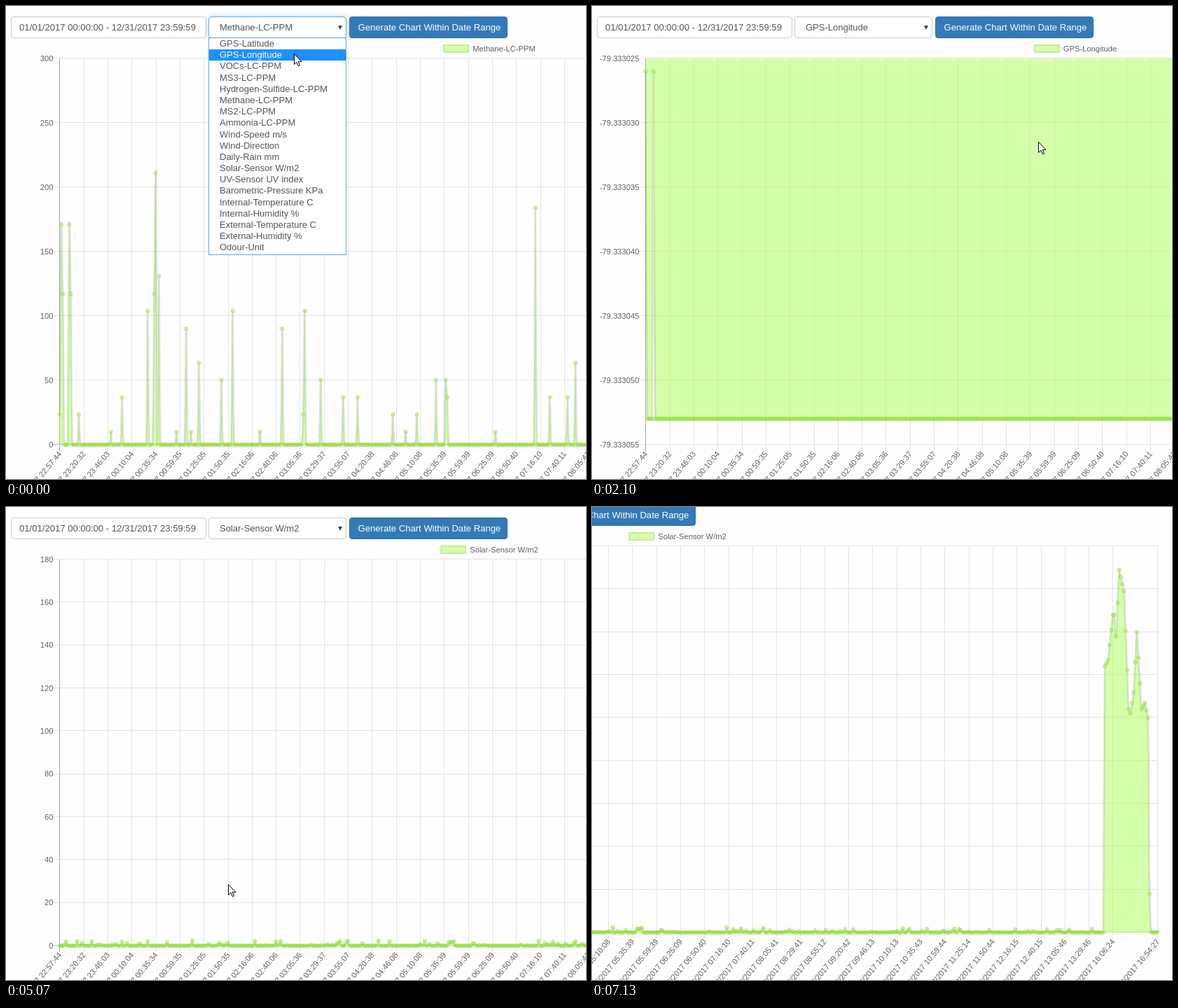
An HTML page with a canvas that plays this animation: 828x676 px, repeating every 8000 ms.

```html
<!DOCTYPE html>
<html lang="en">
<head>
<meta charset="utf-8">
<title>Sensor chart</title>
<style>
  html, body { margin: 0; width: 100%; height: 100%; overflow: hidden; background: #fefefe; }
  body { position: relative; font: 13px "Liberation Sans", Arial, sans-serif; color: #555; }
  #page { position: absolute; left: 0; top: 0; width: 1400px; height: 720px; }
  #page > * { position: absolute; box-sizing: border-box; white-space: nowrap; }
  svg, canvas { left: 0; top: 0; }
  .field { top: 14.5px; height: 31px; line-height: 29px; border: 1px solid #ccc; border-radius: 4px; background: #fff; }
  #range { left: 7px; width: 278.5px; padding-left: 11px; font-size: 13.1px; }
  #select { left: 289px; width: 197px; padding-left: 15px; }
  #select.focus { border-color: #66afe9; box-shadow: 0 0 7px rgba(102, 175, 233, .6); }
  #select::after { content: ""; position: absolute; right: 5px; top: 12px; border: 3px solid transparent; border-top: 6px solid #444; border-bottom: 0; }
  #button { left: 490px; width: 226px; padding-left: 11.5px; font-size: 13.1px; color: #fff; background: #337ab7; border-color: #2e6da4; }
  #button.hover { background: #286090; border-color: #204d74; }
  #list { left: 289px; top: 45px; width: 197px; height: 311px; background: #fff; border: 1px solid #66a3d8; }
  #list div { height: 16.2px; line-height: 16.2px; padding-left: 15px; }
  #list .on { background: #1e90ff; color: #fff; }
  #legend { left: 690px; top: 54px; height: 13px; display: flex; align-items: center; gap: 5px; transform: translateX(-50%); font-size: 11.2px; color: #606060; }
  #legend i { box-sizing: border-box; width: 37px; height: 12px; background: #d5fea9; border: 2px solid rgba(0, 0, 0, .07); }
  #grid text { font-size: 11.2px; fill: #606060; text-anchor: end; dominant-baseline: central; }
  #cursor { position: absolute; left: 0; top: 0; width: 14px; height: 21px; overflow: visible; }
</style>
</head>
<body>
<div id="page">
  <svg id="grid" width="1400" height="720"></svg>
  <canvas id="plot" width="1400" height="720"></canvas>
  <div id="legend"><i></i><span></span></div>
  <div id="range" class="field">01/01/2017 00:00:00 - 12/31/2017 23:59:59</div>
  <div id="select" class="field"></div>
  <div id="button" class="field">Generate Chart Within Date Range</div>
  <div id="list"></div>
</div>
<svg id="cursor"><path d="M.5 .5V15.5L4 12.3L6.4 17.8L8.6 16.8L6.2 11.4H11Z" fill="#fff" stroke="#000"/></svg>
<script>
const $ = id => document.getElementById(id);
const LOOP = 8000, TOP = 75, BOTTOM = 627, LEFT = 76.5, RIGHT = 1375.5, COUNT = 569;
const DX = (RIGHT - LEFT) / (COUNT - 1);

const options = ["GPS-Latitude", "GPS-Longitude", "VOCs-LC-PPM", "MS3-LC-PPM", "Hydrogen-Sulfide-LC-PPM",
  "Methane-LC-PPM", "MS2-LC-PPM", "Ammonia-LC-PPM", "Wind-Speed m/s", "Wind-Direction", "Daily-Rain mm",
  "Solar-Sensor W/m2", "UV-Sensor UV index", "Barometric-Pressure KPa", "Internal-Temperature C",
  "Internal-Humidity %", "External-Temperature C", "External-Humidity %", "Odour-Unit"];

const clamp = (v, a, b) => Math.max(a, Math.min(b, v));
const smooth = p => (p = clamp(p, 0, 1), p * p * (3 - 2 * p));

function random(seed) {
  return () => (seed = (seed * 16807) % 2147483647) / 2147483647;
}

// Linear value at x between [x, y] points
function between(points, x) {
  const i = points.findIndex(p => p[0] > x);
  if (i < 1) return 0;
  const [x0, y0] = points[i - 1], [x1, y1] = points[i];
  return y0 + (y1 - y0) * (x - x0) / (x1 - x0);
}

// Ticks come every 25.5 minutes, two in six after 24, with a slight clock drift
function tickTimes() {
  const out = ["22:57:44"];
  let s = (23 * 60 + 20) * 60 + 32;
  for (let i = 1; i < 36; i++) {
    const at = Math.round(s + (i > 1) + .38 * (i - 1));
    out.push([at / 3600 % 24, at / 60 % 60, at % 60].map(n => String(Math.floor(n)).padStart(2, "0")).join(":"));
    s += i % 6 === 2 || i % 6 === 4 ? 1440 : 1530;
  }
  return out.concat("16:06:24", "16:54:27");
}

const fill = rule => Array.from({ length: COUNT }, (_, i) => rule(i));

const rnd = random(71);
const peaks = new Map([[1, 171], [2, 117], [6, 171], [7, 117], [55, 104], [59, 117], [60, 211], [62, 131],
  [79, 90], [108, 104], [139, 90], [153, 104], [297, 184]]);
const methane = fill(i => {
  const hit = rnd() < .12, level = Math.floor(5 * rnd() ** 1.4);
  return peaks.get(i) || (hit ? 10 + 13.4 * level : 0);
});

const longitude = fill(i => i === 0 || i === 5 ? -79.333026 : -79.333053);

const daylight = [[534, 0], [535, 124], [537, 127], [540, 148], [541, 148], [542, 138], [544, 169], [547, 159],
  [550, 104], [551, 102], [553, 112], [555, 140], [558, 104], [560, 107], [562, 100], [563, 18], [564, 0], [570, 0]];
const solar = fill(i => {
  const hit = rnd() < .35, size = 2.5 * rnd() ** 3;
  return between(daylight, i) || (hit ? size : 0);
});

const charts = [
  { start: -2000, name: "Methane-LC-PPM", data: methane, min: 0, max: 300, step: 50, digits: 0 },
  { start: 1306, name: "GPS-Longitude", data: longitude, min: -79.333055, max: -79.333025, step: .000005, digits: 6 },
  { start: 4212, name: "Solar-Sensor W/m2", data: solar, min: 0, max: 180, step: 20, digits: 0 }
];

function drawGrid(c) {
  const line = (x1, y1, x2, y2, a) => `<path d="M${x1} ${y1}L${x2} ${y2}" stroke="rgba(0,0,0,${a})"/>`;
  let out = "";
  const rows = Math.round((c.max - c.min) / c.step);
  for (let i = 0; i <= rows; i++) {
    const y = TOP + (BOTTOM - TOP) * i / rows, ly = Math.round(y) - .5;
    out += line(LEFT - 9.5, ly, RIGHT, ly, c.min === 0 && i === rows ? .25 : .1);
    out += `<text x="67.5" y="${y - .5}">${(c.max - i * c.step).toFixed(c.digits)}</text>`;
  }
  tickTimes().forEach((time, i) => {
    const x = i < 37 ? LEFT + i * 15 * DX : RIGHT, lx = Math.round(x - .05) + .5;
    out += line(lx, TOP, lx, BOTTOM + 9.5, i ? .1 : .35);
    const day = i < 3 ? "11/02/2017" : "11/03/2017";
    out += `<text transform="translate(${x + .5} 638) rotate(-50)">${day} ${time}</text>`;
  });
  $("grid").innerHTML = out;
  $("legend").lastChild.textContent = c.name;
}

const ctx = $("plot").getContext("2d");

function drawPlot(c, t) {
  const left = 1 - Math.min(1, (t - c.start) / 800);
  const grown = 1 - left ** 4;
  const base = c.max < 0 ? TOP : BOTTOM;
  const pts = c.data.map((v, i) => {
    const y = BOTTOM - (v - c.min) / (c.max - c.min) * (BOTTOM - TOP);
    return { x: LEFT + i * DX, y: base + (y - base) * grown };
  });
  // Smoothed line: control points follow the neighbours, kept inside the chart
  pts.forEach((p, i) => {
    const a = pts[i - 1] || p, b = pts[i + 1] || p;
    const d1 = Math.hypot(p.x - a.x, p.y - a.y), d2 = Math.hypot(b.x - p.x, b.y - p.y);
    const f1 = .4 * d1 / (d1 + d2), f2 = .4 * d2 / (d1 + d2);
    p.inX = p.x - f1 * (b.x - a.x); p.inY = clamp(p.y - f1 * (b.y - a.y), TOP, BOTTOM);
    p.outX = p.x + f2 * (b.x - a.x); p.outY = clamp(p.y + f2 * (b.y - a.y), TOP, BOTTOM);
  });
  const curve = new Path2D();
  pts.forEach((p, i) => {
    const a = pts[i - 1];
    if (a) curve.bezierCurveTo(a.outX, a.outY, p.inX, p.inY, p.x, p.y);
    else curve.moveTo(p.x, p.y);
  });
  const area = new Path2D(curve);
  area.lineTo(RIGHT, base);
  area.lineTo(LEFT, base);

  ctx.clearRect(0, 0, 1400, 720);
  ctx.fillStyle = "rgba(172,255,86,.5)";
  ctx.fill(area);
  ctx.strokeStyle = "rgba(0,0,0,.1)";
  ctx.lineWidth = 2.75;
  ctx.lineJoin = "round";
  ctx.stroke(curve);
  ctx.fillStyle = "rgba(150,230,60,.35)";
  ctx.strokeStyle = "rgba(135,215,45,.5)";
  ctx.lineWidth = 1;
  for (const p of pts) {
    ctx.beginPath();
    ctx.arc(p.x, p.y, 2.6, 0, 7);
    ctx.fill();
    ctx.stroke();
  }
}

// Pointer rests: [arrive, leave, x, y]
const rests = [[0, 420, 411, 68], [990, 1135, 600, 28], [1359, 2100, 637, 194], [2722, 2860, 452, 32],
  [3268, 3410, 417, 236], [3814, 3960, 628, 34], [4224, 4500, 619, 148], [5330, LOOP, 200, 690]];

function pointer(t) {
  const i = rests.findIndex(r => r[1] >= t);
  const [arrive, , x, y] = rests[i];
  if (t >= arrive) return [x, y];
  const [, leave, x0, y0] = rests[i - 1];
  const f = smooth((t - leave) / (arrive - leave));
  return [x0 + (x - x0) * f, y0 + (y - y0) * f];
}

// The recording opens with two long holds, then advances in even steps
function snap(t) {
  if (t < 540) return t < 280 ? 0 : 280;
  return 540 + 136.4 * Math.min(48, Math.floor((t - 540) / 136.4));
}

$("list").innerHTML = options.map(o => `<div>${o}</div>`).join("");
let shown, lastTime;

function render(t) {
  const chart = charts.filter(c => c.start <= t).pop();
  if (chart !== shown) drawGrid(shown = chart);
  drawPlot(chart, t);

  const [x, y] = pointer(t);
  $("cursor").style.transform = `translate(${Math.round(x)}px,${Math.round(y)}px)`;
  const scrollX = Math.round(568 * smooth((t - 5802) / 1150)), scrollY = t > 7080 ? 19 : 0;
  $("page").style.transform = `translate(${-scrollX}px,${-scrollY}px)`;

  const picked = t < 280 ? 5 : t < 3380 ? 1 : 11;
  const open = t < 280 || (t > 2850 && t < 3380);
  $("select").textContent = options[picked];
  $("select").classList.toggle("focus", t < 1120 || (t > 2850 && t < 3940));
  $("button").classList.toggle("hover", x > 490 && x < 716 && y > 14 && y < 46);
  $("list").style.display = open ? "block" : "none";
  const row = y < 46 ? picked : Math.floor((y - 46) / 16.2);
  [...$("list").children].forEach((d, i) => d.classList.toggle("on", i === row));
}

function tick(now) {
  const t = snap(now % LOOP);
  if (t !== lastTime) render(lastTime = t);
  requestAnimationFrame(tick);
}
render(lastTime = 0);
requestAnimationFrame(tick);
</script>
</body>
</html>
```
